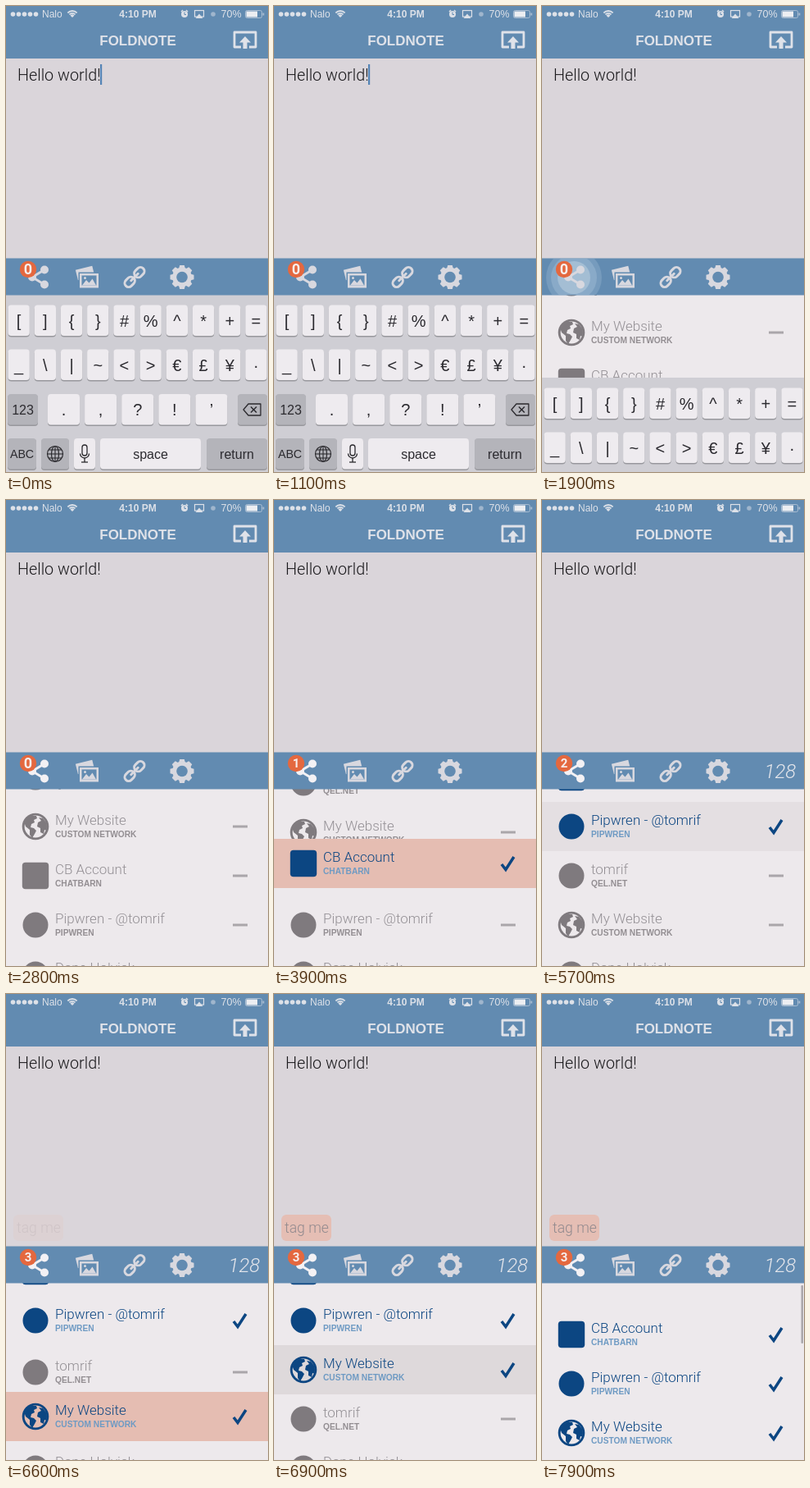
Animation, 320 px wide and 568 px high, one loop 8000 ms. Source, as an HTML page with a canvas:

```html
<!DOCTYPE html>
<html lang="en">
<head>
<meta charset="utf-8">
<title>Share list</title>
<style>
html, body { margin: 0; width: 100%; height: 100%; overflow: hidden; background: #dad5da; }
canvas { display: block; width: 320px; height: 568px; }
</style>
</head>
<body>
<canvas id="stage"></canvas>
<script>
const W = 320, H = 568, LOOP = 8000, STEP = 100;
const BLUE = '#628bb1', PALE = '#d8d8df', LIST = '#ede9ec', NAVY = '#0c4682';
const SANS = '"Liberation Sans", Arial, sans-serif';
const THIN = 'Roboto, "Liberation Sans", sans-serif';
const TAU = Math.PI * 2;

const canvas = document.getElementById('stage');
const c = canvas.getContext('2d');
const ratio = window.devicePixelRatio || 1;
canvas.width = W * ratio;
canvas.height = H * ratio;

const clamp = x => Math.max(0, Math.min(1, x));
const ease = x => (1 - Math.cos(Math.PI * clamp(x))) / 2;
const easeOut = x => 1 - (1 - clamp(x)) ** 3;
const mix = (a, b, k) => a.map((v, i) => Math.round(v + (b[i] - v) * k));
const rgb = a => `rgb(${a.join(',')})`;

// ---- drawing helpers ----
function rect(x, y, w, h, fill) {
  c.fillStyle = fill;
  c.fillRect(x, y, w, h);
}
function round(x, y, w, h, r, fill) {
  c.fillStyle = fill;
  c.beginPath();
  c.roundRect(x, y, w, h, r);
  c.fill();
}
function disc(x, y, r, fill) {
  c.fillStyle = fill;
  c.beginPath();
  c.arc(x, y, r, 0, TAU);
  c.fill();
}
function ring(x, y, r, color, width) {
  c.strokeStyle = color;
  c.lineWidth = width;
  c.beginPath();
  c.arc(x, y, r, 0, TAU);
  c.stroke();
}
function trace(pts) {
  c.beginPath();
  for (let i = 0; i < pts.length; i += 2) c.lineTo(pts[i], pts[i + 1]);
}
function line(pts, color, width, cap = 'butt') {
  c.strokeStyle = color;
  c.lineWidth = width;
  c.lineCap = cap;
  trace(pts);
  c.stroke();
}
function poly(pts, fill) {
  c.fillStyle = fill;
  trace(pts);
  c.fill();
}
function text(s, x, y, font, fill, align = 'left') {
  c.font = font;
  c.fillStyle = fill;
  c.textAlign = align;
  c.fillText(s, x, y);
}
function at(x, y, draw, angle = 0) {
  c.save();
  c.translate(x, y);
  c.rotate(angle);
  draw();
  c.restore();
}

// ---- header ----
function statusBar() {
  const ink = '#dde1e8';
  for (let i = 0; i < 5; i++) disc(8.5 + i * 7, 10, 2.8, ink);
  text('Nalo', 44, 14, `12px ${SANS}`, ink);
  for (const r of [2, 5, 8]) {
    c.strokeStyle = ink;
    c.lineWidth = r === 2 ? 3 : 1.8;
    c.lineCap = 'butt';
    c.beginPath();
    c.arc(81, 14, r, -Math.PI * 0.75, -Math.PI * 0.25);
    c.stroke();
  }
  text('4:10 PM', 161, 14, `bold 12px ${SANS}`, ink, 'center');
  disc(218, 10, 4, ink);
  line([214, 7, 216, 5], ink, 1.5);
  line([220, 5, 222, 7], ink, 1.5);
  line([218, 7.5, 218, 10.5, 220, 10.5], BLUE, 1);
  c.strokeStyle = ink;
  c.lineWidth = 1.2;
  c.strokeRect(230.5, 5.5, 11, 7.5);
  poly([236, 9.5, 240.5, 15, 231.5, 15], ink);
  disc(253, 10, 2.8, '#a0b6cd');
  text('70%', 262.5, 14, `12.5px ${SANS}`, ink);
  c.strokeStyle = '#a9bdd2';
  c.lineWidth = 1;
  c.beginPath();
  c.roundRect(292.5, 5.5, 20, 9, 2);
  c.stroke();
  rect(293.5, 6.5, 13.5, 7, '#eceef2');
  rect(313.5, 8.5, 1.8, 3, '#a9bdd2');
}

function header() {
  rect(0, 0, W, 64, BLUE);
  statusBar();
  const ink = '#dfe2e9';
  text('FOLDNOTE', 161, 47.5, `bold 17px ${SANS}`, ink, 'center');
  c.lineJoin = 'round';
  line([287, 50, 279, 50, 279, 32, 305, 32, 305, 50, 297, 50], ink, 2.8);
  poly([292, 37, 299, 44.5, 294.5, 44.5, 294.5, 52, 289.5, 52, 289.5, 44.5, 285, 44.5], ink);
}

// ---- toolbar ----
function photos() {
  at(96.5, 325, () => rect(-10.5, -6, 21, 13, PALE), -0.24);
  rect(88.5, 324.5, 25.5, 20, BLUE);
  rect(90, 326, 23, 17.5, PALE);
  rect(92.5, 328.5, 18, 12, BLUE);
  poly([93, 340.5, 98, 334, 101.5, 337.5, 105.5, 332.5, 110, 340.5], PALE);
  disc(96.5, 331.5, 1.5, PALE);
}
function chain() {
  at(157, 330.5, () => {
    c.strokeStyle = PALE;
    c.lineWidth = 3;
    for (const x of [-15, 1.5]) {
      c.beginPath();
      c.roundRect(x, -4.8, 13.5, 9.6, 4.8);
      c.stroke();
    }
    line([-6, 0, 6, 0], PALE, 3, 'round');
  }, -Math.PI / 4);
}
function gear() {
  at(215, 330.5, () => {
    for (let i = 0; i < 8; i++) {
      poly([-4, -10, -2.8, -14.5, 2.8, -14.5, 4, -10], PALE);
      c.rotate(TAU / 8);
    }
    disc(0, 0, 11.8, PALE);
    disc(0, 0, 6.8, BLUE);
  });
}
function toolbar(t, count) {
  rect(0, 307.5, W, 45, BLUE);
  const glow = clamp((t - 1500) / 200) * (1 - clamp((t - 1950) / 250));
  if (glow > 0) {
    c.save();
    c.beginPath();
    c.rect(0, 308, W, 44);
    c.clip();
    c.globalAlpha = glow;
    disc(39, 331, 34, 'rgba(200,220,235,.2)');
    disc(39, 331, 28, 'rgba(205,222,236,.22)');
    disc(39, 331, 20, 'rgba(215,226,236,.35)');
    c.restore();
  }
  const ink = t < 2000 ? PALE : '#f3f1f4';
  line([47, 321.5, 32, 330.5, 47, 339.5], ink, 3);
  for (const [x, y] of [[47, 321.5], [32, 330.5], [47, 339.5]]) disc(x, y, 5, ink);
  disc(27, 321, 10.2, '#e4683f');
  const size = count ? 15 : 18;
  text(count, 27, 321 + size * 0.36, `bold ${size}px ${THIN}`, '#f6eeee', 'center');
  photos();
  chain();
  gear();
  if (t >= picks[1].time) text('128', 271.5, 339, `italic 300 24px ${THIN}`, '#e3e5eb');
}

// ---- network list ----
function globe(x, y, ink, back) {
  at(x, y, () => {
    disc(0, 0, 16.3, ink);
    disc(0, 0, 13.4, back);
    c.beginPath();
    c.arc(0, 0, 14, 0, TAU);
    c.clip();
    poly([-14, -6, -8, -13, 1, -13, 2, -10, -2, -8, -1, -5, -5, -3, -6, 1, -2, 2, 1, 5,
      -1, 9, -4, 14, -7, 10, -7, 4, -12, 0], ink);
    poly([4, -11, 9, -10, 14, -4, 14, 5, 11, 4, 10, 9, 6, 7, 6, 2, 2, 0, 3, -5, 7, -7], ink);
  });
}
const blob = (x, y, ink) => disc(x, y, 15.5, ink);
const tile = (x, y, ink) => round(x - 16.2, y - 16.2, 32.4, 32.4, 4, ink);

const rows = [
  { title: 'tomrif', sub: 'QEL.NET', icon: blob },
  { title: 'My Website', sub: 'CUSTOM NETWORK', icon: globe },
  { title: 'CB Account', sub: 'CHATBARN', icon: tile },
  { title: 'Pipwren - @tomrif', sub: 'PIPWREN', icon: blob },
  { title: 'Dane Holvick', sub: '', icon: blob }
];
const picks = [{ row: 2, time: 3820 }, { row: 3, time: 5310 }, { row: 1, time: 6550 }];
const MOVE = 350;
const PEACH = [229, 189, 178], GREY = [222, 217, 219], BASE = [237, 233, 236];

// Each picked row rises to sit below those already picked; rows it passes drop by one.
function slots(t) {
  const order = rows.map((_, i) => i), shown = order.slice();
  picks.forEach(({ row, time }, dest) => {
    const k = ease((t - time) / MOVE), from = order[row];
    rows.forEach((_, i) => {
      const d = i === row ? dest - from : order[i] >= dest && order[i] < from ? 1 : 0;
      shown[i] += d * k;
      order[i] += d;
    });
  });
  return shown;
}

function highlight(age) {
  if (age < MOVE) return rgb(mix(PEACH, GREY, clamp((age - 150) / (MOVE - 150))));
  return rgb(mix(GREY, BASE, clamp((age - MOVE) / 100)));
}

function listRow(row, y, age) {
  const on = age >= 0;
  const back = on ? highlight(age) : LIST;
  rect(0, y - 30, W, 60, back);
  row.icon(36, y, on ? NAVY : '#7f7a7e', back);
  text(row.title, 60, y - 2.5, `300 17px ${THIN}`, on ? NAVY : '#949095');
  text(row.sub, 60, y + 12.5, `bold 10.2px ${SANS}`, on ? '#6e9ac3' : '#938e92');
  if (on) line([278, y + 1, 283, y + 7.5, 293, y - 8], NAVY, 3.5);
  else rect(277, y - 1.5, 18, 3, '#aaa6aa');
}

function list(t) {
  const scroll = 77 * easeOut((t - 7300) / 550);
  const place = slots(t);
  const since = rows.map(() => -1);
  for (const p of picks) since[p.row] = t - p.time;
  const moving = i => since[i] >= 0 && since[i] < MOVE + 100;
  const order = rows.map((_, i) => i).sort((a, b) => moving(a) - moving(b));

  c.save();
  c.beginPath();
  c.rect(0, 352, W, 216);
  c.clip();
  rect(0, 352, W, 216, LIST);
  for (const i of order) listRow(rows[i], Math.round(338 + 60 * place[i] + scroll), since[i]);
  if (scroll > 0) round(316.5, 355, 2.5, 71, 1.2, '#aaa7ab');
  c.restore();
}

// ---- keyboard ----
function key(x, y, w, dark, label, size) {
  round(x, y + 1, w, 38, 4, '#98989d');
  round(x, y, w, 37.5, 4, dark ? '#b4b4ba' : '#eeebef');
  if (label) text(label, x + w / 2, y + 19 + size * 0.35, `${size}px ${SANS}`, '#2b2a2f', 'center');
}

function keyboard() {
  const ink = '#2b2a2e';
  rect(0, 352, W, 216, '#cfced4');
  ['[]{}#%^*+=', '_\\|~<>€£¥·'].forEach((set, r) =>
    [...set].forEach((ch, i) => key(2.5 + i * 32.2, 364.5 + r * 54, 26.3, false, ch, 20)));
  key(2, 473, 37, true, '123', 16);
  [...'.,?!’'].forEach((ch, i) => key(51 + i * 45.1, 473, 39, false, ch, 20));
  key(283, 473, 36, true);
  c.lineJoin = 'round';
  c.strokeStyle = ink;
  c.lineWidth = 1.3;
  trace([290, 492, 296, 485, 311, 485, 311, 499, 296, 499]);
  c.closePath();
  c.stroke();
  line([299, 488.5, 306, 495.5], ink, 1.5);
  line([306, 488.5, 299, 495.5], ink, 1.5);

  key(2, 527, 35, true, 'ABC', 14.2);
  key(43, 527, 34, true);
  ring(60, 546, 9.5, ink, 1.2);
  c.beginPath();
  c.ellipse(60, 546, 4.5, 9.5, 0, 0, TAU);
  c.stroke();
  line([60, 536.5, 60, 555.5], ink, 1.1);
  line([50.5, 546, 69.5, 546], ink, 1.1);
  for (const s of [-1, 1]) line([52.5, 546 + 5 * s, 67.5, 546 + 5 * s], ink, 1.1);

  key(83, 527, 26, false);
  c.strokeStyle = ink;
  c.lineWidth = 1.3;
  c.beginPath();
  c.roundRect(93, 535, 6, 13, 3);
  c.stroke();
  c.beginPath();
  c.arc(96, 545.5, 5.5, 0, Math.PI);
  c.stroke();
  line([96, 551, 96, 556], ink, 1.3);
  line([92, 556, 100, 556], ink, 1.3);

  key(115, 527, 123, false, 'space', 16);
  key(245, 527, 74, true, 'return', 16);
}

// ---- message area ----
function message(t) {
  rect(0, 64, W, 244, '#dad5da');
  text('Hello world!', 14, 91, `300 19.8px ${THIN}`, '#1a191c');
  if (t < 1732 && t % 1000 < 600) rect(115, 71, 2.2, 25, '#5484b6');
  const tag = clamp((t - picks[2].time) / 300);
  if (tag > 0) {
    c.globalAlpha = tag;
    round(9, 269, 61, 32, 6, '#e5beb4');
    text('tag me', 13, 290.5, `300 17.6px ${THIN}`, '#928a8e');
    c.globalAlpha = 1;
  }
}

function draw(t) {
  c.setTransform(ratio, 0, 0, ratio, 0, 0);
  c.lineJoin = 'miter';
  message(t);
  header();
  c.lineJoin = 'miter';
  list(t);
  const drop = Math.round(216 * ease((t - 1732) / 350));
  if (drop < 216) at(0, drop, keyboard);
  toolbar(t, picks.filter(p => t >= p.time).length);
}

let start;
function tick(now) {
  start ??= now;
  draw(Math.floor(((now - start) % LOOP) / STEP) * STEP);
  requestAnimationFrame(tick);
}
draw(0);
requestAnimationFrame(tick);
</script>
</body>
</html>
```
